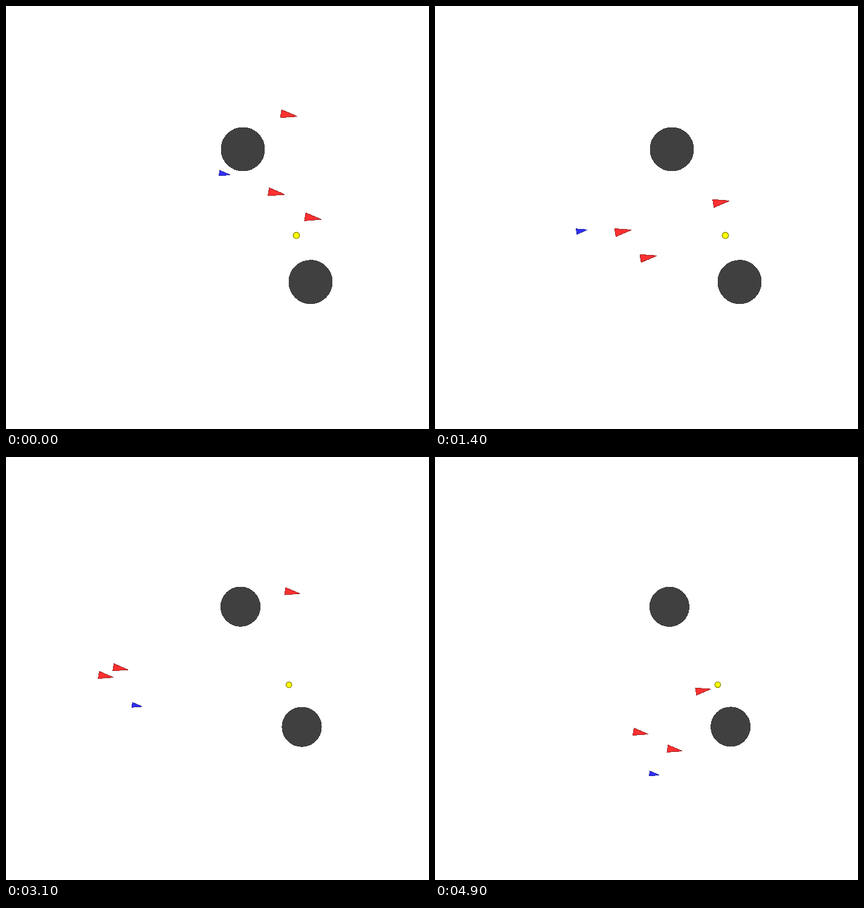
An HTML page for the animation above (5000 ms loop, 700x700 px).

```html
<!DOCTYPE html>
<html lang="en">
<head>
<meta charset="utf-8">
<title>Pursuit</title>
<style>
  html, body { margin: 0; width: 100%; height: 100%; overflow: hidden; background: #fff; }
  svg { display: block; width: 100%; height: 100%; }
  .rock { fill: #404040; stroke: #383838; }
  .red { fill: #ff3030; stroke: #a02424; }
  .blue { fill: #3030ff; stroke: #2424a0; }
  .goal { fill: #ff0; stroke: #8c8c00; stroke-width: 1.4; }
  circle, path { vector-effect: non-scaling-stroke; }
  .rock, path { shape-rendering: crispEdges; }
</style>
</head>
<body>
<svg viewBox="-350 -350 700 700">
  <g id="world">
    <circle class="rock" cx="42" cy="-113" r="36"/>
    <circle class="rock" cx="154" cy="106.7" r="36"/>
    <path class="red" d="M-13.5-6.6L13.5 0L-13.5 6.6Z"/>
    <path class="red" d="M-13.5-6.6L13.5 0L-13.5 6.6Z"/>
    <path class="red" d="M-13.5-6.6L13.5 0L-13.5 6.6Z"/>
    <path class="blue" d="M-9-4.5L9 0L-9 4.5Z"/>
    <circle class="goal" cx="130.5" cy="29.7" r="5.2"/>
  </g>
</svg>
<script>
const STEP = 100, STEPS = 50;
const REACH = 184.4;          // farthest agent allowed from the centre before zooming out
const TILT = 9.5, LEVEL = .7; // nose angle; vertical speed that counts as level

// Each agent passes its turning points at these steps
const times = [0, 10, 13, 18, 25, 31, 36, 43, 45, 49];
const agents = [
  { x: [98, 18.3, -23, -101.5, -174.5, -203.6, -191, -78, -48, -10.5],
    y: [-40.3, 17.5, 25, -3.7, -67.1, 14, 70.9, 79.7, 80.5, 118] },
  { x: [158.3, 47, 15, -44, -115, -177, -103, 22.2, 42, 52],
    y: [1, 60, 70.5, 20, -19, 0, 79.5, 86.4, 87, 149] },
  { x: [118.5, 118.5, 122, 133.3, 127, 137, 147.3, 119, 110, 104],
    y: [-169.5, -24.7, -22, -57.7, -164.3, -139, -69.4, 23.8, 43.5, 40] },
  { x: [12, -57.5, -95, -150, -201, -147, -60.7, 53, 66, 14.4],
    y: [-72, 66.3, 36, -39.3, -25, 68, 115.5, 133, 154, 193.8] }
];

const world = document.getElementById("world");
const shapes = world.querySelectorAll("path");

function slope(p, i) {
  const chord = j => (p[j + 1] - p[j]) / (times[j + 1] - times[j]);
  if (i === 0) return .6 * chord(0); // starting up
  if (i === p.length - 1) return chord(i - 1);
  const before = times[i] - times[i - 1], after = times[i + 1] - times[i];
  return (chord(i - 1) * after + chord(i) * before) / (before + after);
}

// Smooth curve through the points p
function curve(p, t) {
  let i = 0;
  while (i < p.length - 2 && t >= times[i + 1]) i++;
  const h = times[i + 1] - times[i], u = (t - times[i]) / h, v = 1 - u;
  return v * v * (1 + 2 * u) * p[i] + u * u * (1 + 2 * v) * p[i + 1]
    + h * u * v * (v * slope(p, i) - u * slope(p, i + 1));
}

// The view only ever widens, to keep the farthest agent in reach
let farthest = REACH;
const zooms = Array.from({ length: STEPS }, (_, step) => {
  for (const { x } of agents) farthest = Math.max(farthest, Math.abs(curve(x, step)));
  return REACH / farthest;
});

function draw(step) {
  world.setAttribute("transform", `scale(${zooms[step]})`);
  agents.forEach(({ x, y }, i) => {
    const vy = (curve(y, step + .01) - curve(y, step - .01)) / .02;
    const tilt = Math.abs(vy) < LEVEL ? 0 : Math.sign(vy) * TILT;
    shapes[i].setAttribute("transform",
      `translate(${curve(x, step)} ${curve(y, step)}) rotate(${tilt})`);
  });
}

const start = performance.now();
function tick() {
  draw(Math.floor((performance.now() - start) / STEP) % STEPS);
  requestAnimationFrame(tick);
}
tick();
</script>
</body>
</html>
```
